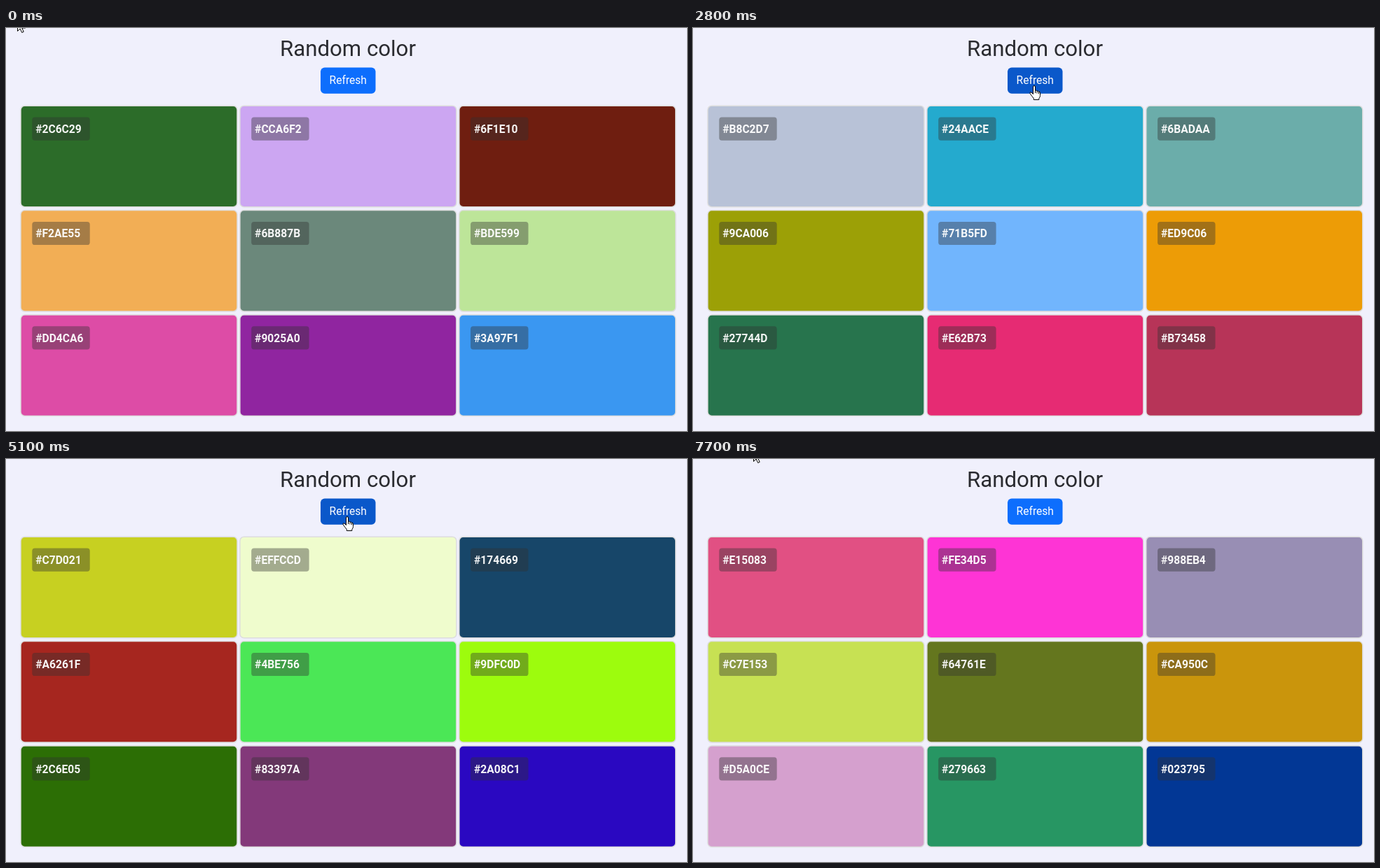
Animation of 972x576 px, one loop 8000 ms. Source, as an HTML page:

```html
<!DOCTYPE html>
<html lang="en">
<head>
<meta charset="utf-8">
<title>Random color</title>
<style>
  html, body { margin: 0; width: 100%; height: 100%; overflow: hidden; background: #f0f0fc; }
  svg { display: block; }
  text { font: 15.6px Roboto, sans-serif; fill: #fff; }
  .title { font-size: 31.2px; fill: #2a2b30; }
  .title, .caption { text-anchor: middle; }
  .tile { stroke: #ddd; stroke-width: 1.5; }
  .badge { fill: #303030; fill-opacity: .4; }
  .code { font-weight: 700; fill-opacity: .95; }
  .cursor { fill: #fff; stroke: #000; stroke-linejoin: round; }
</style>
</head>
<body>
<svg width="972" height="576" viewBox="0 0 972 576">
  <text class="title" x="488" y="40">Random color</text>
  <rect id="button" x="449" y="56.5" width="78.5" height="37.2" rx="5.8"/>
  <text class="caption" x="488.3" y="80.3">Refresh</text>
  <g id="tiles"></g>
  <path id="arrow" class="cursor" d="M.5.5V16.5L4.2 13L6.7 18.5L9.2 17.4L6.8 12H11.8Z"/>
  <path id="hand" class="cursor" d="M5.5 12.5V2A1.5 1.5 0 0 1 8.5 2V7.5Q10 6.3 11 8.3Q12.7 7.2 13.5 9.2Q15.5 8.5 15.5 11V14.5Q15.5 17 13.8 18.5V20.5H6.3V18.5Q4 16 1 11.5Q.6 9.2 3 10ZM8.5 7.5V11M11 8.3V11.5M13.5 9.2V12"/>
</svg>
<script>
const LOOP = 8000, STEP = 100;

// Start time of each palette and its nine colors, row by row.
const palettes = [
  [0, "2C6C29 CCA6F2 6F1E10 F2AE55 6B887B BDE599 DD4CA6 9025A0 3A97F1"],
  [1500, "B8C2D7 24AACE 6BADAA 9CA006 71B5FD ED9C06 27744D E62B73 B73458"],
  [2900, "A4795C 5F9BB8 8C6FA3 B58B4E 6D92C4 A8746B 589A7E C0688D 8F7A46"],
  [4000, "8B2B94 A3F2FA AC07E8 DB6975 AA6B27 1B01CF 4E28A3 28F973 75648F"],
  [5100, "C7D021 EFFCCD 174669 A6261F 4BE756 9DFC0D 2C6E05 83397A 2A08C1"],
  [6400, "E15083 FE34D5 988EB4 C7E153 64761E CA950C D5A0CE 279663 023795"]
].map(([start, codes]) => ({ start, colors: codes.split(" ").map(c => "#" + c) }));

// Cursor hotspot keys: time, x, y.
const cursorKeys = [
  [0, 16, -12], [200, 16, -12], [700, 290, 58], [1000, 480, 84], [1100, 487, 83],
  [6800, 487, 83], [7000, 420, 58], [7200, 240, 22], [7400, 95, -13],
  [7500, 95, -13], [7600, 91, -13], [7700, 86, -13], [LOOP, 86, -13]
];
const presses = [[1500, 1700], [2800, 3000], [3900, 4100], [5000, 5200], [6300, 6500]];

const byId = id => document.getElementById(id);
const button = byId("button"), arrow = byId("arrow"), hand = byId("hand");

function add(name, attributes) {
  const node = document.createElementNS("http://www.w3.org/2000/svg", name);
  for (const key in attributes) node.setAttribute(key, attributes[key]);
  return byId("tiles").appendChild(node);
}

const tiles = Array.from({ length: 9 }, (_, i) => {
  const x = 21 + 312.9 * (i % 3), y = 111.2 + 149.4 * Math.floor(i / 3);
  const tile = add("rect", { class: "tile", x, y, width: 309, height: 144.5, rx: 5.8 });
  add("rect", { class: "badge", x: x + 16.3, y: y + 16.3, width: 82.4, height: 33.2, rx: 3.9 });
  const code = add("text", { class: "code", x: x + 21.2, y: y + 38.8 });
  return { tile, code };
});

function cursorAt(time) {
  const next = cursorKeys.findIndex(key => key[0] > time);
  const [t0, x0, y0] = cursorKeys[next - 1], [t1, x1, y1] = cursorKeys[next];
  const k = (time - t0) / (t1 - t0);
  return [x0 + (x1 - x0) * k, y0 + (y1 - y0) * k].map(Math.round);
}

let shown;
function showPalette(palette) {
  if (palette === shown) return;
  shown = palette;
  tiles.forEach(({ tile, code }, i) => {
    tile.setAttribute("fill", palette.colors[i]);
    code.textContent = palette.colors[i];
  });
}

function draw(now) {
  const time = Math.floor(now % LOOP / STEP) * STEP;
  const [x, y] = cursorAt(time);
  const over = x > 449 && x < 527 && y > 56 && y < 94;
  const pressed = presses.some(([from, to]) => time >= from && time < to);

  showPalette(palettes.findLast(p => p.start <= time));
  button.setAttribute("fill", pressed ? "#0a58ca" : over ? "#0b5ed7" : "#0d6efd");
  arrow.setAttribute("visibility", over ? "hidden" : "visible");
  hand.setAttribute("visibility", over ? "visible" : "hidden");
  arrow.setAttribute("transform", `translate(${x} ${y})`);
  hand.setAttribute("transform", `translate(${x - 7} ${y - 1})`);
}

const begin = performance.now();
function tick() {
  draw(performance.now() - begin);
  requestAnimationFrame(tick);
}
tick();
</script>
</body>
</html>
```
